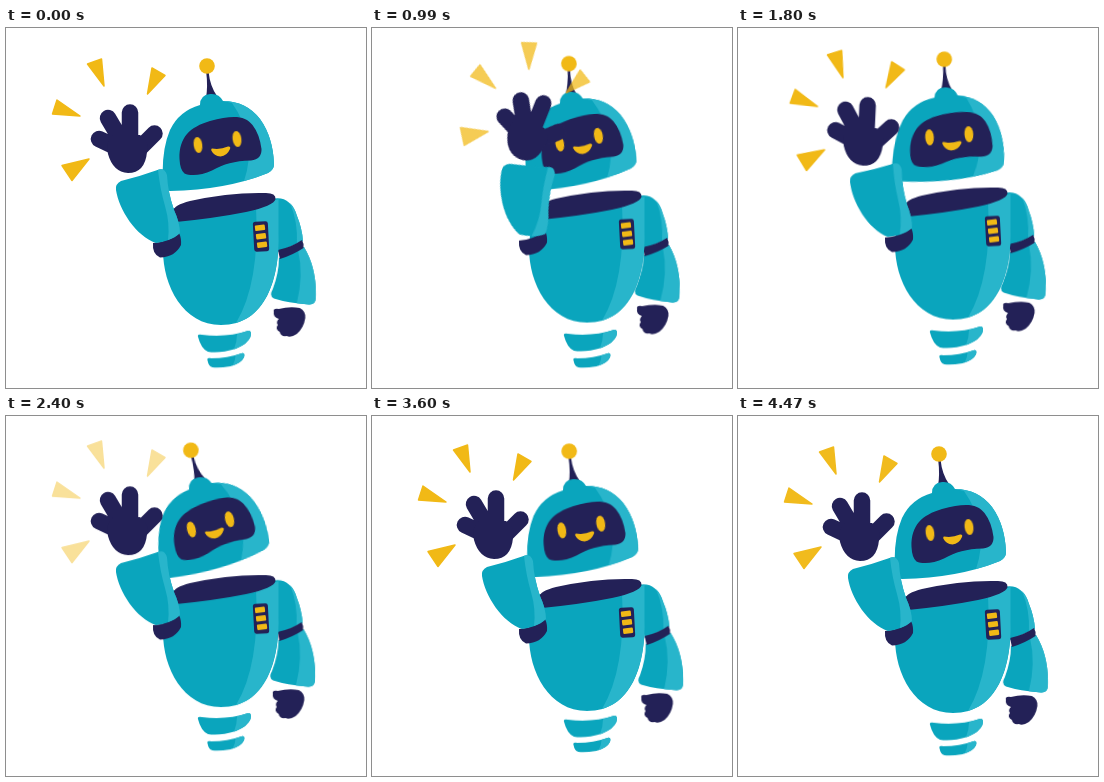
Animation of 360 by 360 pixels, one loop 4.5 s. Source, as an HTML page:

```html
<!DOCTYPE html>
<html lang="en">
<head>
<meta charset="utf-8">
<title>Waving robot</title>
<style>
  :root {
    --teal: #0aa5bd;
    --light: #28b5cb;
    --navy: #232157;
    --gold: #f1b916;
    --sine: cubic-bezier(.37, 0, .63, 1);
  }
  html, body { margin: 0; width: 100%; height: 100%; overflow: hidden; background: #fff; }
  svg { display: block; width: 100vw; height: 100vh; }
  .teal { fill: var(--teal); }
  .light { fill: var(--light); }
  .navy { fill: var(--navy); }
  .gold { fill: var(--gold); }

  .bob, .tail, .head, .antenna, .eye, .wave, .swing {
    animation: 4.5s var(--sine) infinite;
  }
  .bob, .tail { animation-name: bob; }
  .tail.upper { animation-delay: -4.2s; }
  .tail.lower { animation-delay: -4s; }
  .head { animation-name: head; transform-origin: 214px 124px; }
  .antenna { animation-name: antenna; transform-origin: 206px 68px; }
  .eye { animation-name: blink; transform-box: fill-box; transform-origin: center; }
  .wave { animation-name: wave; transform-origin: 165px 205px; }
  .swing { animation-name: swing; animation-delay: -.9s; transform-origin: 285px 180px; }
  .rays { animation: flash .225s var(--sine) infinite alternate; }

  @keyframes bob { 50% { transform: translateY(-6px); } }
  @keyframes swing {
    0%, 100% { transform: rotate(-.75deg); }
    50% { transform: rotate(1.75deg); }
  }
  @keyframes head {
    0%, 9%, 90%, 100% { transform: translate(0, 0) rotate(0deg); }
    22% { transform: translate(-4px, 0) rotate(-2.5deg); }
    41% { transform: translate(-1px, -.6px) rotate(4.2deg); }
    54% { transform: translate(-6px, 0) rotate(-6.2deg); }
    70% { transform: translate(1px, -2.7px) rotate(6.4deg); }
    80% { transform: translate(-2px, -1px) rotate(-1.2deg); }
  }
  @keyframes antenna {
    0%, 9%, 41%, 80%, 100% { transform: rotate(0deg); }
    22% { transform: rotate(7deg); }
    54% { transform: rotate(-2deg); }
    70% { transform: rotate(1deg); }
  }
  @keyframes blink {
    0%, 66.5%, 73%, 100% { transform: none; }
    69.5% { transform: scale(.8, .2); }
  }
  @keyframes wave {
    0%, 9.5%, 48%, 100% { transform: rotate(0deg); }
    26% { transform: rotate(25deg); }
    35% { transform: rotate(-3deg); }
    42.5% { transform: rotate(4.5deg); }
  }
  @keyframes flash { to { opacity: .25; } }
</style>
</head>
<body>
<svg viewBox="0 0 360 360">
  <g class="tail upper">
    <path class="teal" d="M192 309Q191 306 196 307Q221 310 242 303Q246 302 244.500 309Q242 316 230 321Q213 326 202 324Q195 321 192 309Z"/>
    <path class="light" d="M231 306.500L242 303Q246 302 244.500 309Q242 316 228 321.500Q231 314 231 306.500Z"/>
  </g>
  <g class="tail lower">
    <path class="teal" d="M201.500 333Q200.500 330 205.500 331Q221.500 331 235.500 326Q239.500 325 238 330Q235.500 336 224.500 339Q212.500 341 206.500 340Q202.500 339 201.500 333Z"/>
    <path class="light" d="M229.500 328L235.500 326Q239.500 325 238 330Q235.500 335 226.500 338.400Q229.500 333 229.500 328Z"/>
  </g>

  <g class="bob">
    <g class="swing">
      <path class="teal" d="M266 171Q284 167 291 188Q296 200 297 213L272 224Q266 200 266 171Z"/>
      <path class="light" d="M284 175Q289 180 291 188Q296 200 297 213L291 216Q292 194 284 175Z"/>
      <path class="teal" d="M273 230L298 219Q311 240 310 270Q309.500 277 303 276.500Q282 275 268 270.500Q263 268 267 261Q273 245 273 230Z"/>
      <path class="light" d="M292 222L298 219Q311 240 310 270Q309.500 277 303 276.500L291 275.300Q298 247 292 222Z"/>
      <path class="navy" d="M272 222Q286 219 296 212Q298 215 297.500 220Q287 227 274 231Z"/>
      <path class="navy" d="M268 284Q267 280 273 281Q284 278 294 280Q300 283 299.500 290Q298 300 291 306Q285 310 281 308Q275 309 274 304Q269 301 272 297Q270 294 273 291Q267 289 268 284Z"/>
    </g>

    <path class="teal" d="M165 181Q158 200 157 222C157 258 177 297 215 297C260 297 274 250 272.500 205V172Q215 166 165 181Z"/>
    <path class="light" d="M250 179Q254 255 230 295C261 287 274 246 272.500 205V171Z"/>
    <path class="navy" d="M167 183Q168 177 184 173Q224 164 260 165Q270 165 269.500 171Q268 178 240 184Q210 190 170 194Z"/>
    <g transform="rotate(-3 255 208)">
      <rect class="navy" x="247.500" y="193.500" width="15" height="30" rx="2.500"/>
      <g transform="rotate(-4 255 208)">
        <rect class="gold" x="250" y="197" width="10" height="5.500" rx="1"/>
        <rect class="gold" x="250" y="205.500" width="10" height="5.500" rx="1"/>
        <rect class="gold" x="250" y="214" width="10" height="5.500" rx="1"/>
      </g>
    </g>
    <path class="navy" d="M147 215Q162 214 173 205Q175.500 210 175 217Q169 229 154 229.500Q146 226 147 215Z"/>

    <g class="head">
      <g class="antenna">
        <path class="navy" d="M200.200 44H202.600Q204 58 211 68L200 70Q202 58 200.200 44Z"/>
        <circle class="gold" cx="201" cy="38" r="7.800"/>
      </g>
      <path class="teal" d="M194 77Q194 67 204 66Q213 65 217 73Q240 73 254 91Q267 109 268 136Q268 142 262 145Q220 162 164 163Q157 163 157 156Q155 123 164 102Q173 83 194 77Z"/>
      <path class="light" d="M217 73Q240 73 254 91Q267 109 268 136Q268 142 262 145Q250 150 238 153Q252 112 226 75Z"/>
      <path class="navy" d="M173.500 131C173 109 184 99 204 93C226 87 239 87 246.500 97Q253.500 106 255.500 121Q256 131 245 132.500C228 133 218 136 206 142.500C195 148 184 148 178.500 145.500Q174 142 173.500 131Z"/>
      <g transform="rotate(-8 192 117)"><ellipse class="gold eye" cx="192" cy="117" rx="4.300" ry="8"/></g>
      <g transform="rotate(-8 231 111)"><ellipse class="gold eye" cx="231" cy="111" rx="4.400" ry="8"/></g>
      <path class="gold" d="M206 120.500Q214 122 222 118.500Q225 118 224 121Q221 128 214.500 128.500Q208 128 205.300 122.500Q205 120.500 206 120.500Z"/>
    </g>

    <g class="wave">
      <path class="teal" d="M115 153Q135 148 153 141.500Q159 140 161 147Q162 165 168 182Q174 195 174 205Q165 213 150 215C130 208 113 182 110 162Q109 156 115 153Z"/>
      <path class="light" d="M152 142L153 141.500Q159 140 161 147Q162 165 168 182Q174 195 174 205Q169 210 162 212Q164 195 159 178Q154 161 152 142Z"/>
      <path d="M112 120L93 111M115 112L102 90M124 112V84.500M132 122L148.500 105.500" fill="none" stroke="var(--navy)" stroke-width="16.500" stroke-linecap="round"/>
      <path class="navy" d="M107 107L134 107Q144 114 141 124Q139 145 122 145Q107 144 102 126Q99 114 107 107Z"/>
      <g class="rays gold" stroke="var(--gold)" stroke-width="1.500" stroke-linejoin="round">
        <path d="M56 137.500L83 131L66 152.500Z"/>
        <path d="M51 72L46.500 86L74 88Z"/>
        <path d="M81.500 36L95.500 31L98 58Z"/>
        <path d="M146 40L159 47.500L141.500 66Z"/>
      </g>
    </g>
  </g>
</svg>
</body>
</html>
```
